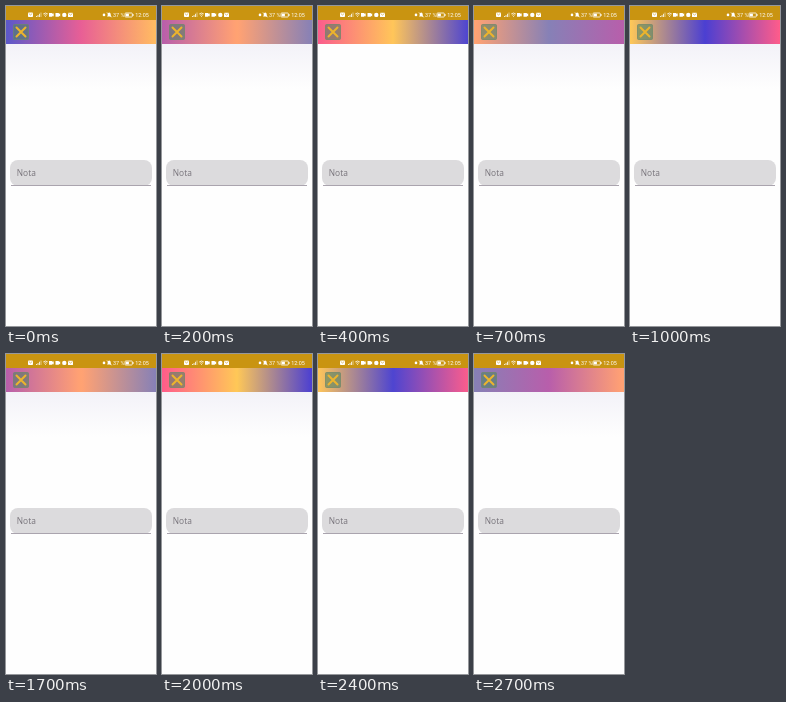
An HTML page that plays this animation: 150 px wide and 320 px high, repeating every 2.8 s.

```html
<!DOCTYPE html>
<html lang="es">
<head>
<meta charset="utf-8">
<style>
  html, body { margin: 0; width: 100%; height: 100%; overflow: hidden; background: #fefefe; }
  #bar { position: absolute; top: 14px; left: 0; width: 150px; height: 24px; }
  #glow { position: absolute; top: 38px; left: 0; width: 150px; height: 45px;
    background: linear-gradient(#f3f2f8, #fefefe); }
  svg { position: absolute; top: 0; left: 0; }
  text { font-family: Roboto, sans-serif; font-size: 5.4px; fill: #fff; }
  .nota { font-family: "Open Sans", sans-serif; font-size: 8.4px; fill: #77737a; }
  .icons { fill: #fff; stroke: none; }
  .lines { fill: none; stroke: #fff; stroke-width: .8; }
</style>
</head>
<body>
<div id="glow"></div>
<div id="bar"></div>
<svg width="150" height="320" viewBox="0 0 150 320">
  <rect width="150" height="14" fill="#c99411"/>
  <g class="icons">
    <rect x="22" y="6.5" width="5" height="4.5" rx=".8"/>
    <path d="M30 11h1v-1h-1zM31.5 11h1v-2h-1zM33 11h1v-3.3h-1z" opacity=".8"/>
    <path d="M34.5 11h1v-4.5h-1z" opacity=".5"/>
    <path d="M43 7h3.4v1l1.3-.8v3.4l-1.3-.8v1H43z"/>
    <path d="M49.5 7h3.4v1l1.3-.8v3.4l-1.3-.8v1h-3.4z"/>
    <circle cx="58.3" cy="8.9" r="2.2"/>
    <rect x="62" y="6.8" width="5" height="4.2" rx=".5"/>
    <circle cx="98" cy="8.9" r="1.3"/>
    <path d="M101 10.5l.7-1V8q.2-1.5 1.5-1.5T104.700 8v1.500l.7 1z"/>
    <rect x="119.700" y="7.700" width="3.200" height="2.600"/>
    <rect x="126.600" y="8" width=".9" height="2"/>
  </g>
  <g class="lines">
    <path d="M37.200 8q2.300-2 4.600 0M38.200 9.300q1.300-1.200 2.600 0M39.500 10.200v.8"/>
    <rect x="119" y="7" width="7.300" height="4" rx=".7"/>
    <path d="M101 6.500l4.600 4.800"/>
  </g>
  <path d="M22.800 7.500l1.700 1.500 1.700-1.500M62.500 7.400l2 1.700 2-1.700" fill="none" stroke="#c99411" stroke-width=".6"/>
  <text x="107" y="10.900">37 %</text>
  <text x="129.300" y="10.900">12:05</text>

  <rect x="7.500" y="18.500" width="15" height="15" rx="1" fill="#50826499" stroke="#6b886a" stroke-opacity=".7"/>
  <path d="M10.500 21.500l9 9M19.500 21.500l-9 9" stroke="#edb42c" stroke-width="2" stroke-linecap="round"/>

  <rect x="4" y="154" width="142" height="26" rx="8" fill="#dcdbdd"/>
  <path d="M5 179.500h140" stroke="#aaa4ae"/>
  <text class="nota" x="10.800" y="170">Nota</text>
</svg>
<script>
const LOOP = 2800, TICK = 100, PHASE = 500;
const colors = ['#4b3fd2', '#ff5c8a', '#ffc857'];
const plainSpans = [[300, 500], [1300, 1600], [2300, 2500]];
const bar = document.getElementById('bar');
const glow = document.getElementById('glow');

// cubic-bezier(.4, 0, .2, 1)
function ease(x) {
  let lo = 0, hi = 1;
  for (let i = 0; i < 20; i++) {
    const s = (lo + hi) / 2, r = 1 - s;
    if (1.2 * r * r * s + .6 * r * s * s + s ** 3 < x) lo = s; else hi = s;
  }
  return lo * lo * (3 - 2 * lo);
}

function draw(now) {
  const t = Math.floor(now % LOOP / TICK) * TICK;
  const phase = (t || LOOP) / PHASE;
  const step = Math.floor(phase);
  const mix = 100 * ease(phase - step);
  const stops = colors.map((_, i) =>
    `color-mix(in oklab, ${colors[(step + i + 1) % 3]} ${mix}%, ${colors[(step + i) % 3]})`);
  bar.style.background = `linear-gradient(in srgb 90deg, ${stops})`;
  glow.hidden = plainSpans.some(([from, to]) => t >= from && t < to);
  requestAnimationFrame(draw);
}
draw(performance.now());
</script>
</body>
</html>
```
